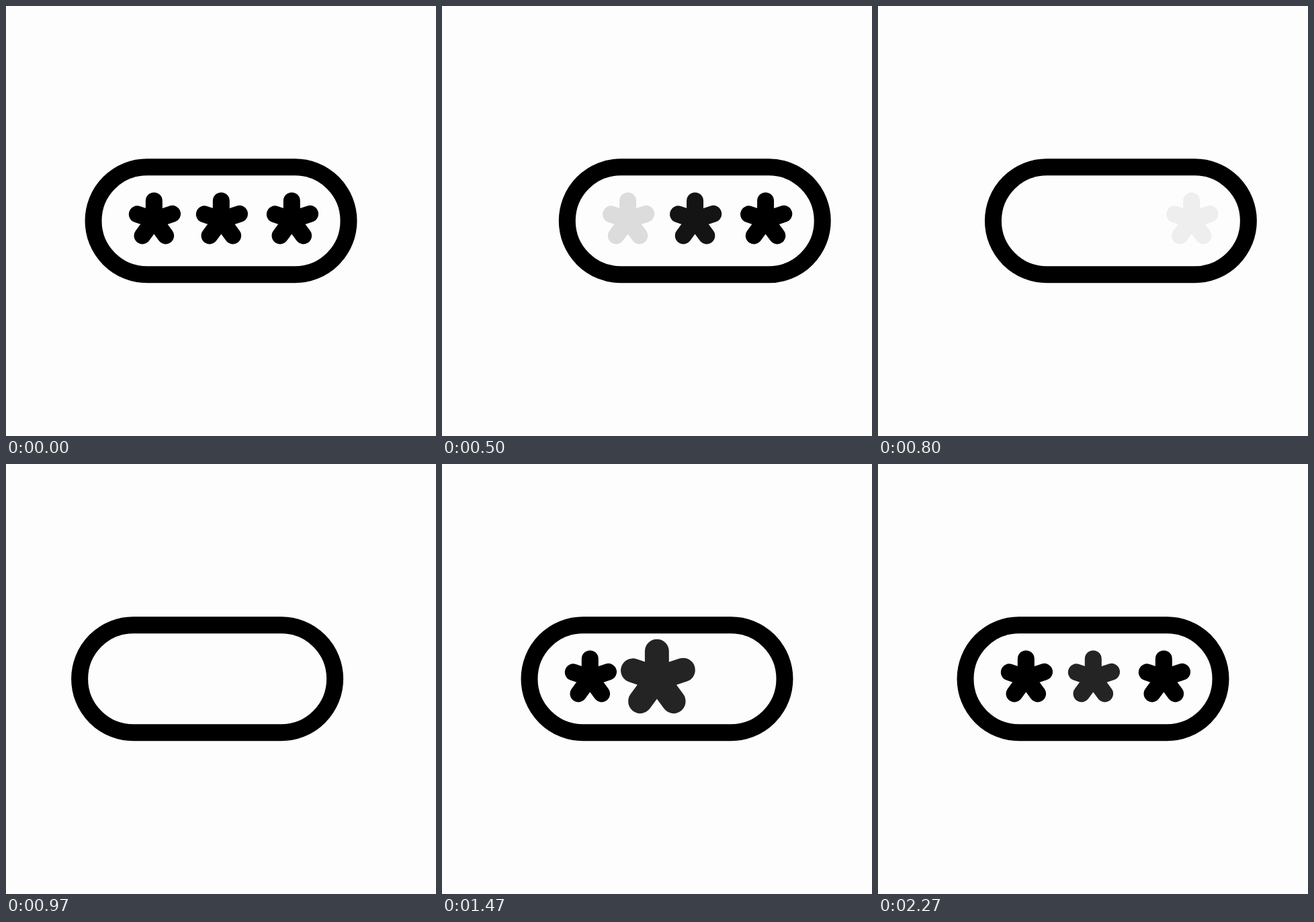
An HTML page that plays this animation: 640x640 px, repeating every 2310 ms.

```html
<!DOCTYPE html>
<html lang="en">
<head>
<meta charset="utf-8">
<title>Password field</title>
<style>
  html, body { margin: 0; width: 100%; height: 100%; overflow: hidden; background: #fdfdfd; }
  svg { display: block; width: 100vw; height: 100vh; }
  path, rect { fill: none; stroke: #000; stroke-width: 25; stroke-linecap: round; stroke-linejoin: round; }
</style>
</head>
<body>
<svg viewBox="0 0 640 640">
  <g id="stars"></g>
  <rect id="pill" x="130" y="239.75" width="380" height="160" rx="80"/>
</svg>
<script>
const LOOP = 2310;
const ARMS = [[0, -28.5], [27.2, -9], [17.3, 23.5], [-17.3, 23.5], [-25, -8.5]];
const MID = { x: 1, y: -2.5 };
const BASE = 318.4;
const SLIDE = [[0, 0], [667, 66.6], [1100, -44], [1306, 0]];
const POP = [[0, 0], [167, 1.45], [334, 1]];
const FADE = 200;
const STARS = [
  { x: 220.3, out: 327, in: 1114, ink: 1, drift: 105 },
  { x: 320.3, out: 485, in: 1314, ink: 0.86, drift: 0 },
  { x: 425.3, out: 613, in: 1514, ink: 1, drift: 0 }
];

const pill = document.getElementById('pill');
const layer = document.getElementById('stars');
const shape = ARMS.map(([x, y]) => `M0 0L${x} ${y}`).join('');
for (const star of STARS) {
  star.el = document.createElementNS('http://www.w3.org/2000/svg', 'path');
  star.el.setAttribute('d', shape);
  layer.append(star.el);
}

const smooth = u => u * u * (3 - 2 * u);

function track(keys, t) {
  if (t <= keys[0][0]) return keys[0][1];
  for (let i = 1; i < keys.length; i++) {
    const [t0, v0] = keys[i - 1], [t1, v1] = keys[i];
    if (t < t1) return v0 + (v1 - v0) * smooth((t - t0) / (t1 - t0));
  }
  return keys[keys.length - 1][1];
}

function place(star, x, y, scale, ink) {
  // A zero-length round-capped stroke would still paint a dot.
  star.el.style.opacity = scale > 0.01 ? ink : 0;
  star.el.setAttribute('transform',
    `translate(${x + MID.x} ${y + MID.y}) scale(${scale}) translate(${-MID.x} ${-MID.y})`);
}

function render(t) {
  const dx = track(SLIDE, t);
  pill.setAttribute('transform', `translate(${dx} 0)`);
  for (const star of STARS) {
    if (t < star.in) {
      const ink = Math.min(1, Math.max(0, 1 - (t - star.out) / FADE));
      place(star, star.x + dx, BASE, 1, ink);
    } else {
      const scale = track(POP, t - star.in);
      const gap = Math.max(0, 1 - scale);
      place(star, star.x + gap * star.drift, BASE + gap * 8, scale, star.ink);
    }
  }
}

const start = performance.now();
function tick() {
  render((performance.now() - start) % LOOP);
  requestAnimationFrame(tick);
}
tick();
</script>
</body>
</html>
```
